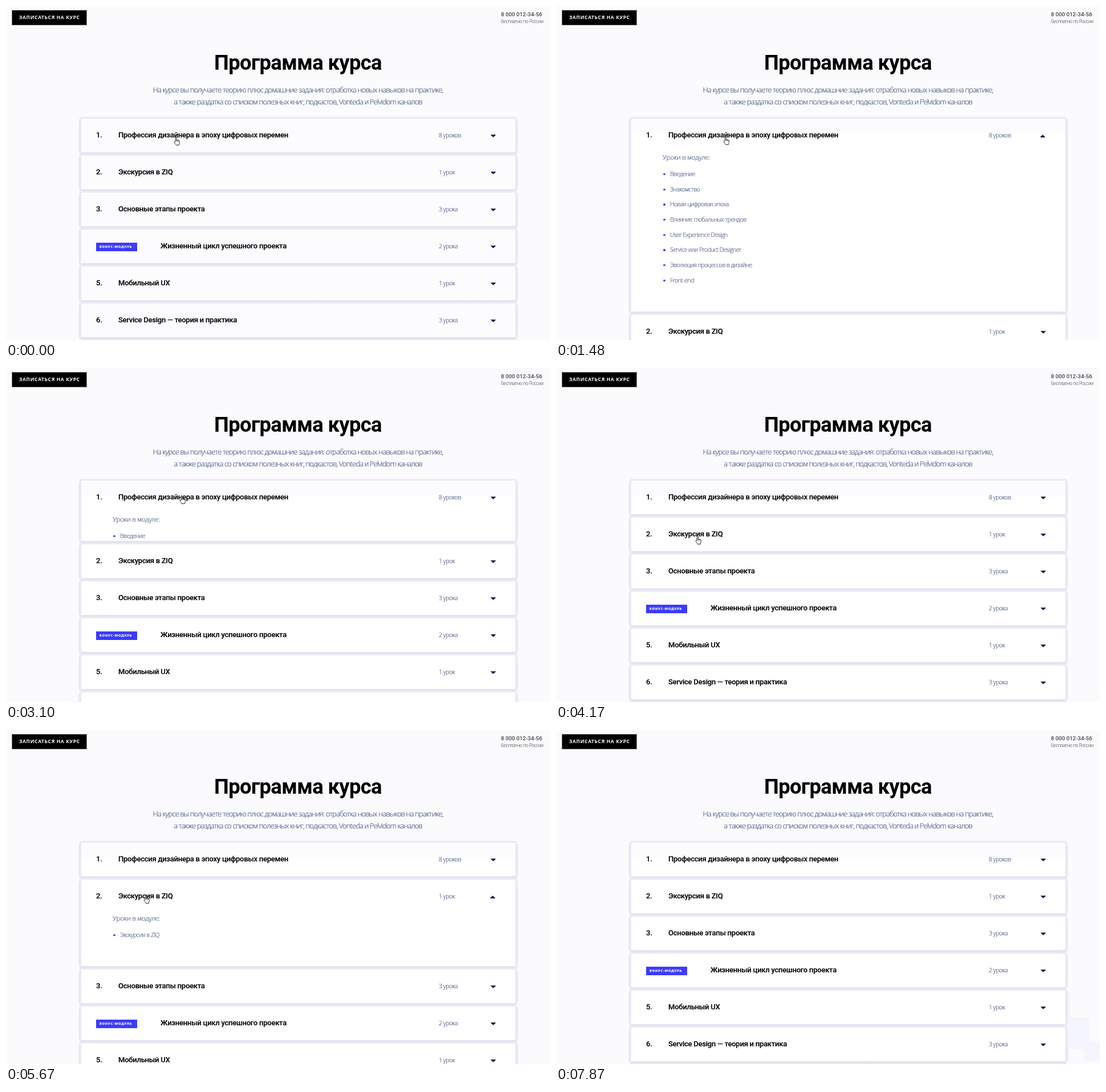
These frames come from a looping animation (954x587 px, 8500 ms). An HTML page:

```html
<!DOCTYPE html>
<html lang="ru">
<head>
<meta charset="utf-8">
<title>Программа курса</title>
<style>
html, body { margin: 0; width: 100%; height: 100%; overflow: hidden; background: #fbfbfe; }
#stage { position: relative; width: 954px; height: 587px; overflow: hidden; isolation: isolate; background: #fbfbfe; }
#stage * { box-sizing: border-box; }

/* Zero line height: "top" is the middle of the line */
.t { position: absolute; margin: 0; line-height: 0; white-space: nowrap; font: 300 10.4px/0 "Open Sans", sans-serif; letter-spacing: -.47px; color: #47557f; -webkit-text-stroke: .15px; }
.button { position: absolute; left: 10px; top: 7px; width: 132px; height: 27px; border: 1px solid rgba(0, 0, 0, .5); background: #000 padding-box; }
.button .t { left: 12px; top: 12px; font-weight: 700; font-size: 8.45px; letter-spacing: .65px; color: #fff; -webkit-text-stroke: 0; }
.phone { left: 868px; top: 15px; font: 500 9.75px/0 Roboto, sans-serif; letter-spacing: 0; color: #444; -webkit-text-stroke: 0; }
.free { left: 868px; top: 27.4px; font-size: 8.45px; letter-spacing: -.5px; color: #666; }
.mid { left: 0; width: 1024px; text-align: center; }
h1.t { top: 100px; font: 700 36.4px/0 Roboto, sans-serif; letter-spacing: -.65px; color: #000; -webkit-text-stroke: 0; }
.lead { font-size: 13px; letter-spacing: -.91px; }

#list { position: absolute; left: 132px; top: 198px; width: 761px; }
.card { position: relative; margin-bottom: 6.5px; animation: paint 8.5s step-end infinite; }
.card::before { content: ""; position: absolute; z-index: -1; inset: -3.5px -5px -5px; border-radius: 5px / 12px; background: #e9eaf5; }
.card::after { content: ""; position: absolute; z-index: -1; left: 0; right: 0; bottom: -6.5px; height: 6.5px; background: linear-gradient(#dfe3ec, #e5e8f1); }
.head { position: relative; height: 58.5px; }
.card:first-child .head { background: linear-gradient(#fcfcfe 26px, transparent 0); }
.num, .name { top: 29.3px; font: 500 13px/0 Roboto, sans-serif; letter-spacing: -.25px; color: #000; }
.num { left: 26px; }
.name { left: 65px; }
.badge { position: absolute; left: 26px; top: 23px; width: 72px; height: 15px; background: #3b3bff; }
.badge .t { left: 6px; top: 7.3px; font-weight: 800; font-size: 5.85px; letter-spacing: .65px; color: #fff; -webkit-text-stroke: 0; }
.badge ~ .name { left: 139px; }
.count { left: 627px; top: 29.2px; letter-spacing: -.4px; }
.arrow { position: absolute; left: 717px; top: 27px; width: 11px; height: 7px; fill: #14214d; stroke: #14214d; stroke-linejoin: round; }
.panel { position: relative; height: 0; overflow: hidden; }
.panel .t { left: 68px; }
.panel .sub { left: 55px; top: 8px; font-size: 11.7px; letter-spacing: -.31px; }
.panel .t i { position: absolute; left: -11.6px; top: -1.1px; width: 3.4px; height: 3.4px; border-radius: 50%; background: #3b3bff; }

#trail { position: absolute; z-index: -1; left: 850px; top: 462px; width: 104px; overflow: hidden; animation: trail 8.5s step-end infinite; }
#trail svg { display: block; fill: #f5f6fd; }
#hand { position: absolute; left: 0; top: 0; width: 12px; height: 16px; overflow: visible; fill: #fff; stroke: #111; stroke-width: .9; stroke-linejoin: round; animation: hand 8.5s linear infinite; }

#p0 { animation: panel1 8.5s cubic-bezier(.37, 0, .63, 1) infinite; }
#p1 { animation: panel2 8.5s cubic-bezier(.37, 0, .63, 1) infinite; }
#a0 { animation: flip1 8.5s step-end infinite; }
#a1 { animation: flip2 8.5s step-end infinite; }

@keyframes paint { 0% { background: #fcfcfe; } 9.76%, 100% { background: #fff; } }
@keyframes panel1 {
  0%, 9.76% { height: 0; }
  14.35% { height: 280px; }
  31.88% { height: 280px; animation-timing-function: cubic-bezier(.4, 0, .75, .85); }
  36.47%, 37.87% { height: 47px; }
  37.88% { height: 10px; }
  38.82%, 100% { height: 0; }
}
@keyframes panel2 {
  0%, 57.53% { height: 0; }
  62.1%, 73.76% { height: 93px; }
  78.4%, 100% { height: 0; }
}
@keyframes flip1 { 0%, 31.88%, 100% { transform: none; } 9.76% { transform: translateX(-1px) scaleY(-1); } }
@keyframes flip2 { 0%, 73.76%, 100% { transform: none; } 57.53% { transform: translateX(-1px) scaleY(-1); } }
@keyframes trail { 0% { height: 0; } 90.8% { height: 43px; } 91.6% { height: 99px; } 92.4%, 100% { height: 121px; } }
@keyframes hand {
  0%, .35% { transform: translate(294px, 230px); }
  1.29%, 17.41% { transform: translate(293px, 229px); }
  19.5% { transform: translate(303px, 234px); }
  21.2% { transform: translate(308px, 235px); }
  22.8% { transform: translate(306px, 228px); }
  24.24%, 41.06% { transform: translate(304px, 224px); }
  43.5% { transform: translate(297px, 240px); }
  46% { transform: translate(265px, 282px); }
  49.06%, 62.3% { transform: translate(244px, 295px); }
  66.7%, 73.76% { transform: translate(241px, 290px); }
  79.06% { transform: translate(244px, 289px); }
  81.2% { transform: translate(270px, 281px); }
  83.53%, 83.88% { transform: translate(348px, 279px); }
  85.5% { transform: translate(430px, 266px); }
  88% { transform: translate(640px, 300px); }
  90.5% { transform: translate(860px, 440px); }
  91.5% { transform: translate(905px, 510px); }
  92.3% { transform: translate(940px, 560px); }
  92.59%, 100% { transform: translate(960px, 575px); }
}
</style>
</head>
<body>
<div id="stage">
  <div class="button"><span class="t">ЗАПИСАТЬСЯ НА КУРС</span></div>
  <span class="t phone">8 000 012-34-56</span>
  <span class="t free">бесплатно по России</span>
  <h1 class="t mid">Программа курса</h1>
  <p class="t mid lead" style="top:146.7px">На курсе вы получаете теорию плюс домашние задания: отработка новых навыков на практике,</p>
  <p class="t mid lead" style="top:167.6px">а также раздатка со списком полезных книг, подкастов, Vonteda и Pelvidom каналов</p>
  <div id="trail"><svg width="104" height="121"><path d="M0 0H52V43H85V86H104V121H76V99H0z"/></svg></div>
  <div id="list"></div>
  <svg id="hand" viewBox="0 0 12 16"><path d="M3.2 8.5V1.6a1 1 0 0 1 2 0V6c.2-.6 1.6-.6 1.8.2.4-.5 1.5-.3 1.7.4.5-.4 1.6-.1 1.6 1v2.9c0 1.6-1 2.3-1 4H4.2c0-1.3-2-3-3-4.8C.5 8.5 1.6 7.6 2.4 8.2z"/><path d="M7 6.3V8M8.7 6.7V8.2M5.2 6V8"/></svg>
</div>
<script>
const modules = [
  { name: 'Профессия дизайнера в эпоху цифровых перемен', count: '8 уроков', lessons: [
    'Введение', 'Знакомство', 'Новая цифровая эпоха', 'Влияние глобальных трендов',
    'User Experience Design', 'Service или Product Designer', 'Эволюция процессов в дизайне', 'Front-end'] },
  { name: 'Экскурсия в ZIQ', count: '1 урок', lessons: ['Экскурсия в ZIQ'] },
  { name: 'Основные этапы проекта', count: '3 урока' },
  { name: 'Жизненный цикл успешного проекта', count: '2 урока', bonus: true },
  { name: 'Мобильный UX', count: '1 урок' },
  { name: 'Service Design — теория и практика', count: '3 урока' }
];

const text = (cls, s) => `<span class="t ${cls}">${s}</span>`;
const lesson = (s, i) => `<span class="t" style="top:${38.5 + i * 26.67}px"><i></i>${s}</span>`;
const panel = (list, i) =>
  `<div class="panel" id="p${i}">${text('sub', 'Уроки в модуле:')}${list.map(lesson).join('')}</div>`;
const card = (m, i) => `<div class="card"><div class="head">
  ${m.bonus ? `<div class="badge">${text('', 'БОНУС-МОДУЛЬ')}</div>` : text('num', `${i + 1}.`)}
  ${text('name', m.name)}${text('count', m.count)}
  <svg class="arrow" id="a${i}" viewBox="0 0 11 7"><path d="M1.5 1.6H9.5L5.5 5.3z"/></svg>
  </div>${m.lessons ? panel(m.lessons, i) : ''}</div>`;

document.getElementById('list').innerHTML = modules.map(card).join('');
</script>
</body>
</html>
```
